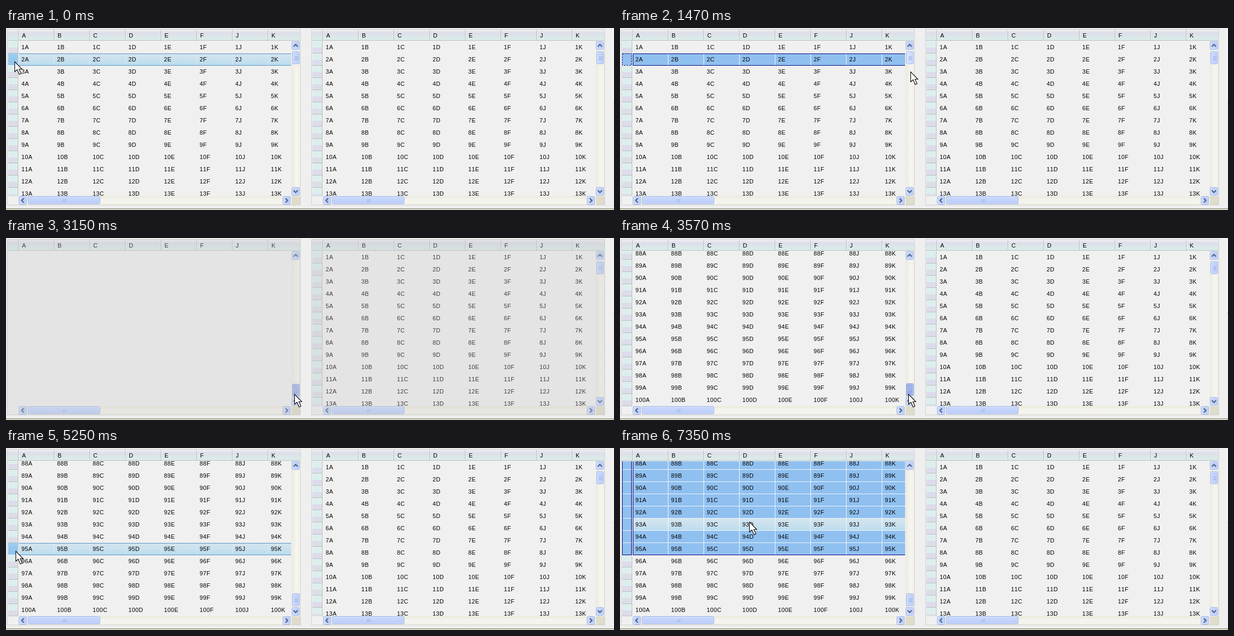
An HTML page with a canvas that plays this animation: 1143x343 px, repeating every 8 s.

```html
<!DOCTYPE html>
<html lang="en">
<head>
<meta charset="utf-8">
<style>
html, body { margin: 0; width: 1143px; height: 343px; overflow: hidden; background: #efefef; }
canvas { display: block; }
</style>
</head>
<body>
<canvas id="stage" width="1143" height="343"></canvas>
<script>
const ctx = document.getElementById('stage').getContext('2d');
const LOOP = 8000, COLS = 'ABCDEFJK', ROW = 23, COL = 67, LAST = 100;
const NAVY = '#000080', SELECTED = '#90c0f0';

// Each step changes only what it lists and keeps the rest.
const steps = [
  { t: 0, x: 16, y: 63, scroll: 0, thumb: 44, look: 'normal', hover: 2, sel: null },
  { t: 210, sel: [2, 2] },
  { t: 630, x: 300, y: 82, hover: 3 },
  { t: 1050, x: 549, y: 64, hover: 0, look: 'hot' },
  { t: 1470, x: 546, y: 82 },
  { t: 1890, x: 542, y: 186, scroll: null, thumb: 166, look: 'pressed' },
  { t: 2310, y: 293, thumb: 270 },
  { t: 2730, y: 294, thumb: 275 },
  { t: 3150, busy: true },
  { t: 3570, scroll: 2008, thumb: 274, sel: null, busy: false },
  { t: 3990, x: 414, y: 249 },
  { t: 4620, x: 18, y: 205, hover: 96, look: 'normal' },
  { t: 5250, y: 194, hover: 95 },
  { t: 5880, sel: [1, 95] },
  { t: 7350, x: 243, y: 139, hover: 93 }
];
const idle = { scroll: 0, thumb: 44, look: 'normal', hover: 0, sel: null };

// Fill start, fill end, edge, grip light, grip dark.
const looks = {
  normal: ['#cbdafd', '#b9cbf9', '#98b0e4', '#dfe9fe', '#8ca6e6'],
  hot: ['#dae6ff', '#c4d6fd', '#98b0e4', '#eaf1ff', '#8ca6e6'],
  pressed: ['#8fa6e6', '#a4b9f2', '#7890d0', '#c3d1f7', '#7890d8']
};

function rect(x, y, w, h, fill) {
  ctx.fillStyle = fill;
  ctx.fillRect(x, y, w, h);
}

function shade(x0, y0, x1, y1, ...colors) {
  const g = ctx.createLinearGradient(x0, y0, x1, y1);
  colors.forEach((c, i) => g.addColorStop(i / (colors.length - 1), c));
  return g;
}

function text(s, x, y) {
  ctx.fillStyle = '#000';
  ctx.fillText(s, x, y);
}

function clipTo(x, y, w, h, draw) {
  ctx.save();
  ctx.beginPath();
  ctx.rect(x, y, w, h);
  ctx.clip();
  draw();
  ctx.restore();
}

function knob(x, y, w, h, look = 'normal', upright = true) {
  const [from, to, edge] = looks[look];
  ctx.beginPath();
  ctx.roundRect(x + .5, y + .5, w - 1, h - 1, 2);
  ctx.fillStyle = upright ? shade(x, 0, x + w, 0, from, to) : shade(0, y, 0, y + h, from, to);
  ctx.fill();
  ctx.lineWidth = 1;
  ctx.strokeStyle = edge;
  ctx.stroke();
  ctx.beginPath();
  ctx.roundRect(x + 1.5, y + 1.5, w - 3, h - 3, 1);
  ctx.strokeStyle = 'rgba(255,255,255,.35)';
  ctx.stroke();
}

function arrow(x, y, turn) {
  knob(x, y, 15, 16);
  ctx.save();
  ctx.translate(x + 7.5, y + 8);
  ctx.rotate(turn * Math.PI / 2);
  ctx.beginPath();
  ctx.moveTo(-4, 2);
  ctx.lineTo(0, -2);
  ctx.lineTo(4, 2);
  ctx.lineWidth = 2.2;
  ctx.strokeStyle = '#4d6185';
  ctx.stroke();
  ctx.restore();
}

function scrollbars({ thumb, look }) {
  const track = ['#ebead8', '#f2f1ec', '#f5f5f0', '#f0f0e4'];
  rect(537, 24, 16, 293, shade(537, 0, 553, 0, ...track));
  rect(24, 317, 513, 16, shade(0, 317, 0, 333, ...track));
  rect(537, 317, 16, 16, '#dedcca');
  arrow(537, 25, 0);
  arrow(537, 300, 2);
  arrow(24, 317, 3);
  arrow(520, 317, 1);
  knob(538, thumb, 14, 24, look);
  knob(41, 317, 136, 15, 'normal', false);
  const [, , , light, dark] = looks[look];
  for (let i = 0; i < 4; i++) {
    rect(541, thumb + 8 + 2 * i, 7, 1, light);
    rect(542, thumb + 9 + 2 * i, 7, 1, dark);
    rect(105 + 2 * i, 321, 1, 6, looks.normal[3]);
    rect(106 + 2 * i, 322, 1, 6, looks.normal[4]);
  }
}

function rowHead(y, hot, chosen) {
  if (chosen || hot) {
    rect(4, y, 18, 22, chosen ? SELECTED : shade(0, y, 0, y + 22, '#9ccdf0', '#8fc3f0'));
  } else {
    rect(4, y, 18, 12, '#dcefee');
    rect(4, y + 12, 18, 10, '#dddcea');
    rect(4, y + 22, 18, 1, '#b9bfb9');
  }
  rect(22, y, 1, ROW, '#b9bfb9');
}

function gridRow(n, y, hot, chosen) {
  rowHead(y, hot, chosen);
  if (hot || chosen) {
    rect(24, y, 512, 22, hot ? shade(0, y, 0, y + 22, '#d3e4ee', '#cbe1ee', '#b9dcef') : SELECTED);
    rect(4, y + 22, 532, 1, '#f4f8fb');
    const line = chosen ? '#f4f8fb' : '#d9e9f3';
    for (let i = 1; i < COLS.length; i++) rect(23 + COL * i, y, 1, ROW, line);
    if (hot && !chosen) {
      rect(24, y, 512, 1, '#5a90c8');
      rect(24, y + 22, 512, 1, '#5a90c8');
    }
  }
  [...COLS].forEach((c, i) => text(n + c, 29 + COL * i, y + 15));
}

function selectionFrame([a, b], top) {
  const y = top(a), h = ROW * (b - a + 1);
  rect(24, y, 512, 1, NAVY);
  rect(24, y + h - 1, 512, 1, NAVY);
  rect(24, y, 1, h, NAVY);
  ctx.setLineDash(a === b ? [3, 2] : []);
  ctx.lineWidth = 1;
  ctx.strokeStyle = NAVY;
  ctx.strokeRect(4.5, y + .5, 17, h - 1);
  ctx.setLineDash([]);
}

function rows({ scroll, hover, sel }) {
  const top = n => 2 + ROW * n - scroll;
  for (let n = 1; n <= LAST; n++) {
    const y = top(n);
    if (y > 1 && y < 317) gridRow(n, y, n === hover, sel && n >= sel[0] && n <= sel[1]);
  }
  if (sel) selectionFrame(sel, top);
}

function header() {
  rect(3, 3, 550, 20, shade(0, 3, 0, 23, '#eeeef2', '#dedeea', '#dae8e8', '#dcebea'));
  rect(3, 23, 550, 1, '#b9c1bf');
  [...COLS].forEach((c, i) => {
    rect(23 + COL * i, 4, 1, 19, '#b4b8b8');
    rect(24 + COL * i, 4, 1, 19, '#f3f6f6');
    text(c, 30 + COL * i, 18);
  });
}

function grid(x, state) {
  ctx.save();
  ctx.translate(x, 0);
  rect(2, 2, 552, 332, '#d0d0d0');
  rect(3, 3, 550, 330, '#f0f0f0');
  if (state.scroll !== null) clipTo(3, 25, 533, 292, () => rows(state));
  header();
  scrollbars(state);
  ctx.restore();
}

function pointer(x, y) {
  ctx.save();
  ctx.translate(x + .5, y + .5);
  ctx.beginPath();
  [[0, 0], [0, 19], [4.5, 15], [8.5, 24], [12, 22.5], [8, 14], [13.5, 14]].forEach(p => ctx.lineTo(...p));
  ctx.closePath();
  ctx.fillStyle = '#fff';
  ctx.fill();
  ctx.lineWidth = 1.1;
  ctx.strokeStyle = '#000';
  ctx.stroke();
  ctx.restore();
}

function page() {
  rect(0, 0, 1143, 343, '#efefef');
  rect(0, 340, 1143, 1, '#8a8b78');
  rect(0, 341, 1143, 1, '#cfcfb8');
  rect(0, 342, 1143, 1, '#f0f0e0');
  rect(1141, 0, 1, 140, '#fafafa');
  rect(1142, 140, 1, 1, '#8e8f80');
}

function draw(now) {
  const t = now % LOOP;
  const state = Object.assign({}, ...steps.filter(s => s.t <= t));
  ctx.font = '11px "Liberation Sans", Arial, sans-serif';
  ctx.fontKerning = 'none';
  ctx.letterSpacing = '0.4px';
  page();
  grid(0, state);
  grid(572, idle);
  if (state.busy) for (const x of [2, 574]) rect(x, 2, 552, 332, 'rgba(200,200,200,.3)');
  pointer(state.x, state.y);
}

const start = performance.now();
function tick() {
  draw(performance.now() - start);
  requestAnimationFrame(tick);
}
tick();
</script>
</body>
</html>
```
